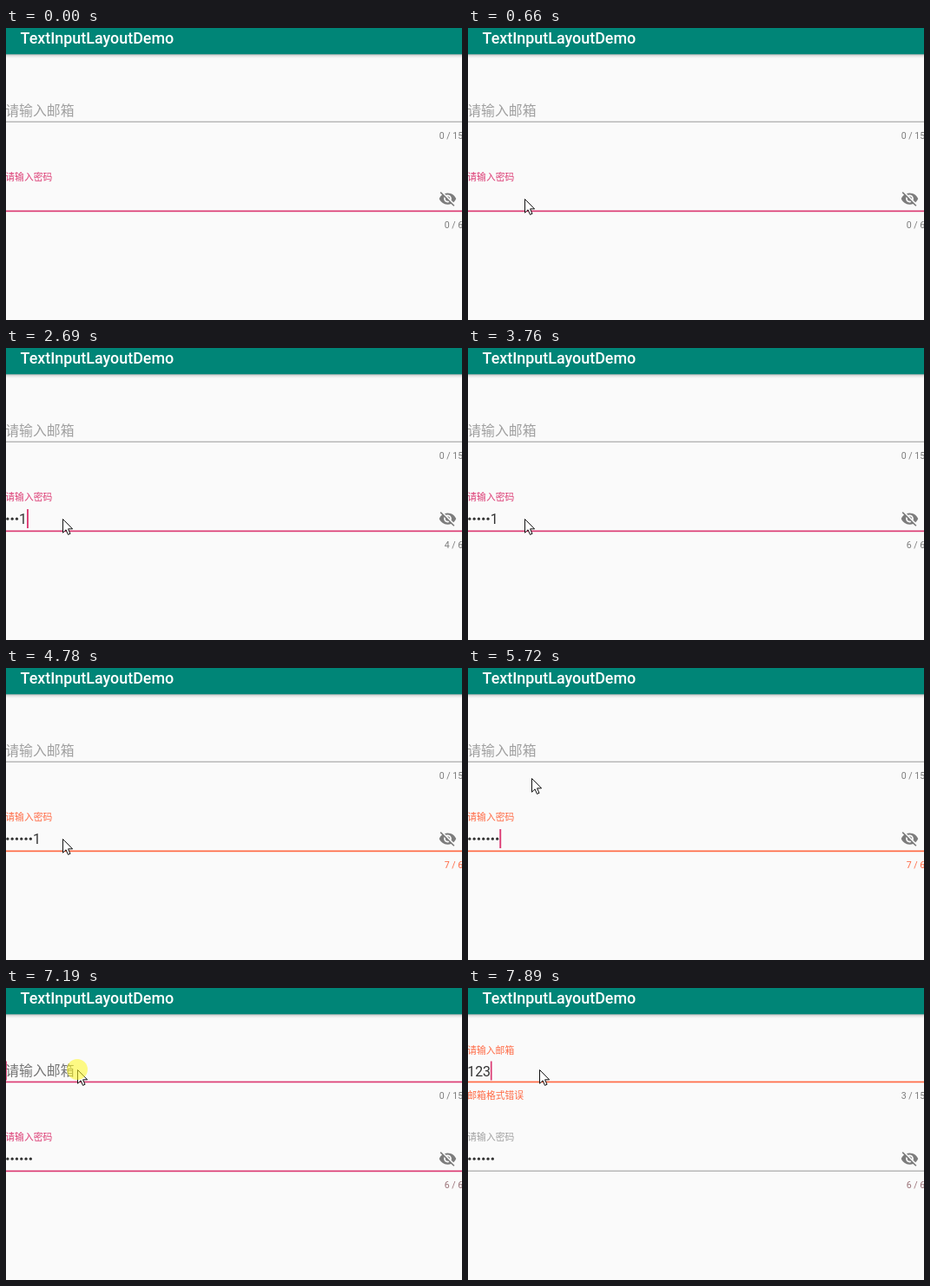
An HTML page for the animation above (8000 ms loop, 525 px wide and 337 px high).

```html
<!DOCTYPE html>
<html lang="zh-CN">
<head>
<meta charset="utf-8">
<title>TextInputLayoutDemo</title>
<style>
  html, body { margin: 0; height: 100%; overflow: hidden; background: #fafafa; }
  svg { display: block; width: 100%; height: 100%; }
  text { font-family: Roboto, "Noto Sans CJK SC", "Noto Sans CJK", sans-serif; white-space: pre; }
  .small { font-size: 10.8px; }
  .count { font-size: 10.6px; text-anchor: end; fill: #7c7c7c; }
  .value { font-size: 15.9px; fill: #333; }
  .caret { fill: #dc3c74; }
</style>
</head>
<body>
<svg viewBox="0 0 525 337">
  <defs>
    <linearGradient id="shade" x2="0" y2="1">
      <stop stop-color="#000" stop-opacity=".3"/>
      <stop offset=".4" stop-color="#000" stop-opacity=".1"/>
      <stop offset="1" stop-color="#000" stop-opacity="0"/>
    </linearGradient>
  </defs>
  <rect y="30" width="525" height="5" fill="url(#shade)"/>
  <rect width="525" height="30.3" fill="#008577"/>
  <text x="16.6" y="17.5" font-size="17.9" font-weight="500" fill="#fff">TextInputLayoutDemo</text>

  <text id="mailLabel" x="-.8">请输入邮箱</text>
  <text id="mailText" class="value" x="-.8" y="101.7"></text>
  <rect id="mailCaret" class="caret" y="84.5" width="1.7" height="22"/>
  <rect id="mailLine" width="525"/>
  <text id="mailError" class="small" x="-.7" y="128" fill="#ff6a45">邮箱格式错误</text>
  <text id="mailCount" class="count" x="526.2" y="128"></text>

  <text id="passLabel" class="small" x="-.7" y="176">请输入密码</text>
  <g id="dots" fill="#333"></g>
  <text id="digit" class="value" y="203.2">1</text>
  <rect id="passCaret" class="caret" y="186" width="1.9" height="22"/>
  <rect id="passLine" width="525"/>
  <text id="passCount" class="count" x="526.2" y="230.5"></text>
  <path transform="translate(497.9 186.4) scale(.885)" fill="#7c7c7c" d="M12 7c2.76 0 5 2.24 5 5 0 .65-.13 1.26-.36 1.83l2.92 2.92c1.51-1.26 2.7-2.89 3.43-4.75-1.73-4.39-6-7.5-11-7.5-1.4 0-2.74.25-3.98.7l2.16 2.16C10.74 7.13 11.35 7 12 7zM2 4.27l2.74 2.74C3.08 8.3 1.78 10.02 1 12c1.73 4.39 6 7.5 11 7.5 1.55 0 3.03-.3 4.38-.84L19.73 22 21 20.73 3.27 3zM7.53 9.8l1.55 1.55c-.05.21-.08.43-.08.65 0 1.66 1.34 3 3 3 .22 0 .44-.03.65-.08l1.55 1.55c-.67.33-1.41.53-2.2.53-2.76 0-5-2.24-5-5 0-.79.2-1.53.53-2.2zm4.31-.78l3.15 3.15.02-.16c0-1.66-1.34-3-3-3z"/>

  <path id="mouse" d="M.5 .5V16.2L4.1 12.8 6.5 18.4 9 17.3 6.6 11.8H11.6Z" fill="#fff" stroke="#111"/>
  <circle id="click" r="12" fill="#fff720" fill-opacity=".55"/>
</svg>
<script>
const LOOP = 8000, PINK = '#dc3c74', RED = '#ff6a45', GREY = '#a0a0a0';
const LEFT = -.8, DOT = 5.3, DIGIT = 8.9;

const keys = [2150, 2300, 2440, 2690, 2920, 3300, 4250];
const mailKeys = [7740, 7810, 7890];
const blinks = [190, 660, 1130, 1590, 1910, 3760, 4250, 4780, 5240, 5780, 6240, 6940];
const ERASE = 6410, MASK = 5720, FOCUS = 7190, FLOAT = 7340, FLOATED = 7420;

// time, x, y of each pointer step
const moves = [
  [70, 308, 309], [130, 210, 262], [190, 110, 222], [260, 68, 207],
  [430, 67, 204], [510, 66, 201], [580, 65, 197],
  [5490, 65, 187], [5570, 66, 165], [5650, 69, 143], [5720, 73, 127], [5780, 78, 118], [5890, 82, 114],
  [6790, 82, 110], [6860, 82, 102], [6940, 82, 96], [7020, 82, 94]
];

const $ = id => document.getElementById(id);
const set = (id, attrs) => { for (const k in attrs) $(id).setAttribute(k, attrs[k]); };
const show = (id, on) => set(id, { visibility: on ? 'visible' : 'hidden' });
const passed = (times, t) => times.filter(k => k <= t).length;

function line(id, y, colour) {
  set(id, { y: y, height: colour ? 1.7 : 1.4, fill: colour || '#b4b4b4' });
}

function password(t) {
  const count = passed(keys, t) - (t >= ERASE);
  const plain = count > 0 && t < MASK;
  const dots = plain ? count - 1 : count;
  const over = count > 6, active = t < FLOAT;
  const colour = over ? RED : active ? PINK : null;
  [...$('dots').children].forEach((dot, i) =>
    dot.setAttribute('visibility', i < dots ? 'visible' : 'hidden'));
  show('digit', plain);
  set('digit', { x: LEFT + dots * DOT });
  show('passCaret', passed(blinks, t) % 2);
  set('passCaret', { x: LEFT + dots * DOT + plain * DIGIT });
  set('passLabel', { fill: colour || GREY });
  line('passLine', 210.5, colour);
  $('passCount').textContent = count + ' / 6';
  $('passCount').style.fill = over ? RED : t >= ERASE ? '#9a7278' : '#7c7c7c';
}

function email(t) {
  const count = passed(mailKeys, t), focus = t >= FOCUS;
  const up = t >= FLOATED ? 1 : t >= FLOAT ? .6 : 0;
  const colour = count ? RED : focus ? PINK : null;
  set('mailLabel', {
    y: 101 - 25 * up,
    'font-size': 15.9 - 5.1 * up,
    fill: up ? colour : focus ? '#757575' : GREY
  });
  $('mailText').textContent = '123'.slice(0, count);
  show('mailCaret', focus);
  set('mailCaret', { x: LEFT + count * DIGIT });
  line('mailLine', 107.6, colour);
  set('mailError', { opacity: [0, .4, .75, 1][count] });
  $('mailCount').textContent = count + ' / 15';
}

function pointer(t) {
  const step = moves[passed(moves.map(m => m[0]), t) - 1];
  const pressed = t >= 1830 && t < 1910 || t >= FOCUS && t < FLOAT;
  show('mouse', step);
  show('click', pressed);
  if (!step) return;
  set('mouse', { transform: `translate(${step[1]} ${step[2]})` });
  set('click', { cx: step[1], cy: step[2] });
}

function draw(now) {
  const t = now % LOOP;
  password(t);
  email(t);
  pointer(t);
}

$('dots').innerHTML = keys.map((_, i) =>
  `<circle cx="${LEFT + (i + .5) * DOT}" cy="197.2" r="1.6"/>`).join('');

const start = performance.now();
function frame() {
  draw(performance.now() - start);
  requestAnimationFrame(frame);
}
frame();
</script>
</body>
</html>
```
